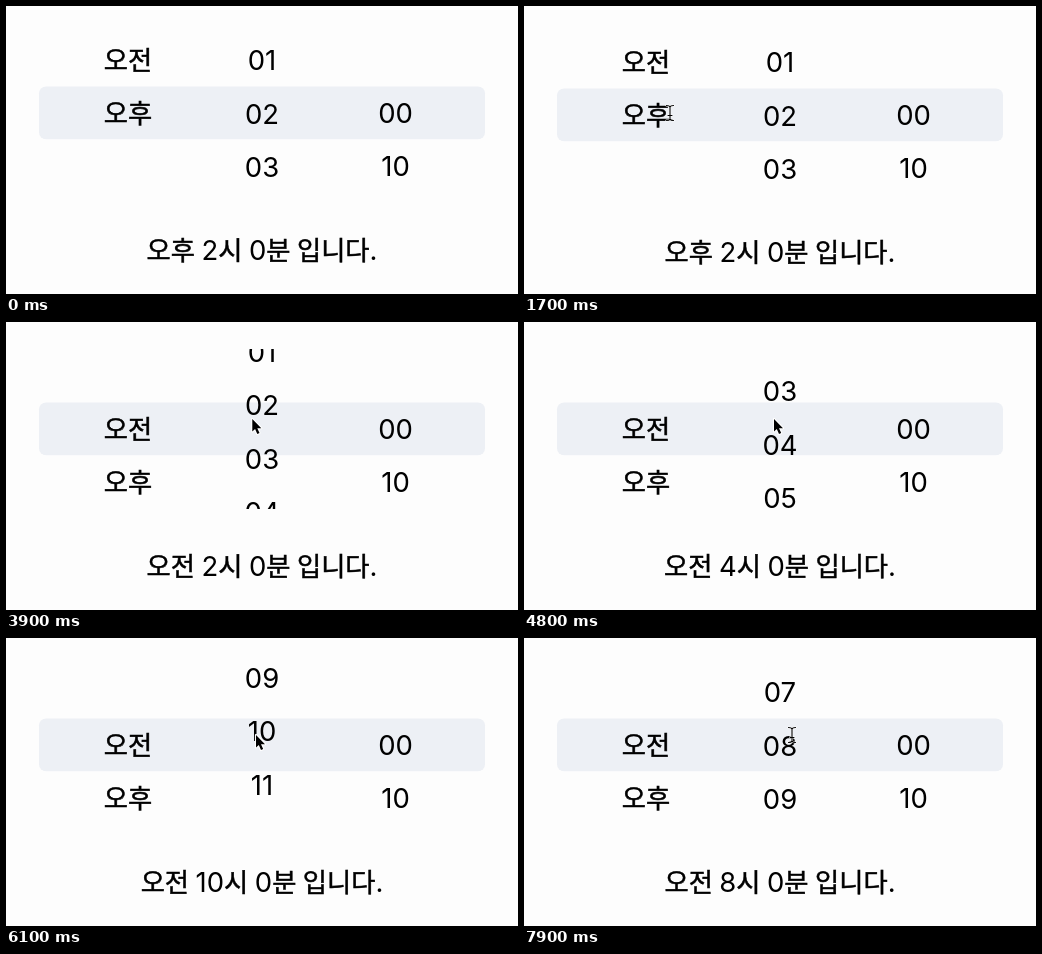
An HTML page with a canvas for the animation above (8 s loop, 512 px wide and 288 px high).

```html
<!DOCTYPE html>
<html lang="ko">
<head>
<meta charset="utf-8">
<title>시간 선택</title>
<style>
  html, body { margin: 0; width: 100%; height: 100%; overflow: hidden; background: #fdfdfd; }
  canvas { display: block; width: 512px; height: 288px; }
</style>
</head>
<body>
<canvas id="stage"></canvas>
<script>
const WIDTH = 512, HEIGHT = 288, LOOP = 8000, STEP = 100;
const PITCH = 160 / 3, BASELINE = 117, SPACE = 6.5;
const DIGIT_FONT = '400 27.5px Inter, sans-serif';
const HANGUL_FONT = '400 26.3px "Noto Sans CJK KR", "Noto Sans CJK", sans-serif';

const canvas = document.getElementById('stage');
const ctx = canvas.getContext('2d');
const scale = window.devicePixelRatio || 1;
canvas.width = WIDTH * scale;
canvas.height = HEIGHT * scale;

const clamp = value => Math.min(1, Math.max(0, value));

// Each move eases out from wherever the previous one ended.
function glide(time, initial, moves) {
  return moves.reduce((value, { start, end, to, power = 1.5 }) =>
    value + (to - value) * (1 - (1 - clamp((time - start) / (end - start))) ** power), initial);
}

const periodMoves = [{ start: 2200, end: 2900, to: 0 }];
const hourMoves = [
  { start: 3700, end: 4300, to: 3 },
  { start: 4700, end: 5100, to: 4, power: 4.4 },
  { start: 5400, end: 6300, to: 11 },
  { start: 6900, end: 7900, to: 8, power: 2 }
];
const pointerMoves = [
  { start: 400, end: 1200, x: 146, y: 107 },
  { start: 2200, end: 2600, x: 133, y: 99 },
  { start: 3000, end: 4000, x: 250, y: 97 },
  { start: 6400, end: 6700, x: 257, y: 97 },
  { start: 6900, end: 7600, x: 268, y: 97 }
];
const along = axis => pointerMoves.map(move => ({ ...move, to: move[axis] }));
const pointerX = along('x'), pointerY = along('y');

const pageShift = time => 2 * Math.sin(Math.PI * clamp((time - 1100) / 1200));

function drawText(text, centerX, baseline) {
  const runs = text.match(/[가-힣]+|\s|[^가-힣\s]+/g).map(run => {
    if (run === ' ') return { run, width: SPACE };
    const hangul = /[가-힣]/.test(run);
    const font = hangul ? HANGUL_FONT : DIGIT_FONT;
    ctx.font = font;
    return { run, font, hangul, width: ctx.measureText(run).width };
  });
  let x = centerX - runs.reduce((sum, r) => sum + r.width, 0) / 2;
  ctx.fillStyle = ctx.strokeStyle = '#000';
  ctx.lineWidth = 0.5;
  for (const { run, font, hangul, width } of runs) {
    if (font) {
      ctx.font = font;
      ctx.fillText(run, x, baseline);
      if (hangul) ctx.strokeText(run, x, baseline);
    }
    x += width;
  }
}

function drawWheel(items, position, centerX, baseline = BASELINE) {
  items.forEach((item, i) => {
    const offset = i - position;
    if (Math.abs(offset) < 2) drawText(item, centerX, baseline + offset * PITCH);
  });
}

const beam = new Path2D('M-3.5-7.5Q-.5-7.5 0-6Q.5-7.5 3.5-7.5M0-6V6M-3.5 7.5Q-.5 7.5 0 6Q.5 7.5 3.5 7.5M-2 2.5H2');
const arrow = new Path2D('M0 0V12.5L2.8 9.9L5 15L7.2 14L5 9.2H9Z');

function drawPointer(time) {
  if (time < 400) return;
  const isArrow = time < 1000 || (time >= 3200 && time < 6500);
  const shape = isArrow ? arrow : beam;
  ctx.save();
  ctx.translate(glide(time, 388, pointerX), glide(time, -4, pointerY));
  ctx.lineJoin = ctx.lineCap = 'round';
  ctx.strokeStyle = '#fff';
  ctx.lineWidth = 2.2;
  ctx.stroke(shape);
  ctx.fillStyle = ctx.strokeStyle = '#000';
  ctx.lineWidth = 1.1;
  if (isArrow) ctx.fill(shape);
  else ctx.stroke(shape);
  ctx.restore();
}

const periods = ['오전', '오후'];
const hours = Array.from({ length: 12 }, (_, i) => String(i + 1).padStart(2, '0'));
const minutes = Array.from({ length: 6 }, (_, i) => i + '0');

function draw(time) {
  const period = glide(time, 1, periodMoves);
  const hour = glide(time, 2, hourMoves);
  ctx.setTransform(scale, 0, 0, scale, 0, 0);
  ctx.fillStyle = '#fdfdfd';
  ctx.fillRect(0, 0, WIDTH, HEIGHT);

  ctx.save();
  ctx.translate(0, pageShift(time));
  ctx.fillStyle = '#edf0f5';
  ctx.beginPath();
  ctx.roundRect(33, 80.5, 446, 52.8, 7);
  ctx.fill();

  ctx.save();
  ctx.beginPath();
  ctx.rect(0, 27, WIDTH, 160);
  ctx.clip();
  drawWheel(periods, period, 122);
  drawWheel(hours, hour - 1, 256, BASELINE + 0.5);
  drawWheel(minutes, 0, 389.5);
  ctx.restore();

  drawText(`${periods[Math.round(period)]} ${Math.round(hour)}시 0분 입니다.`, 256, 254);
  ctx.restore();

  drawPointer(time);
}

const start = performance.now();
function tick() {
  const time = (performance.now() - start) % LOOP;
  draw(Math.floor(time / STEP) * STEP);
  requestAnimationFrame(tick);
}
tick();
</script>
</body>
</html>
```
